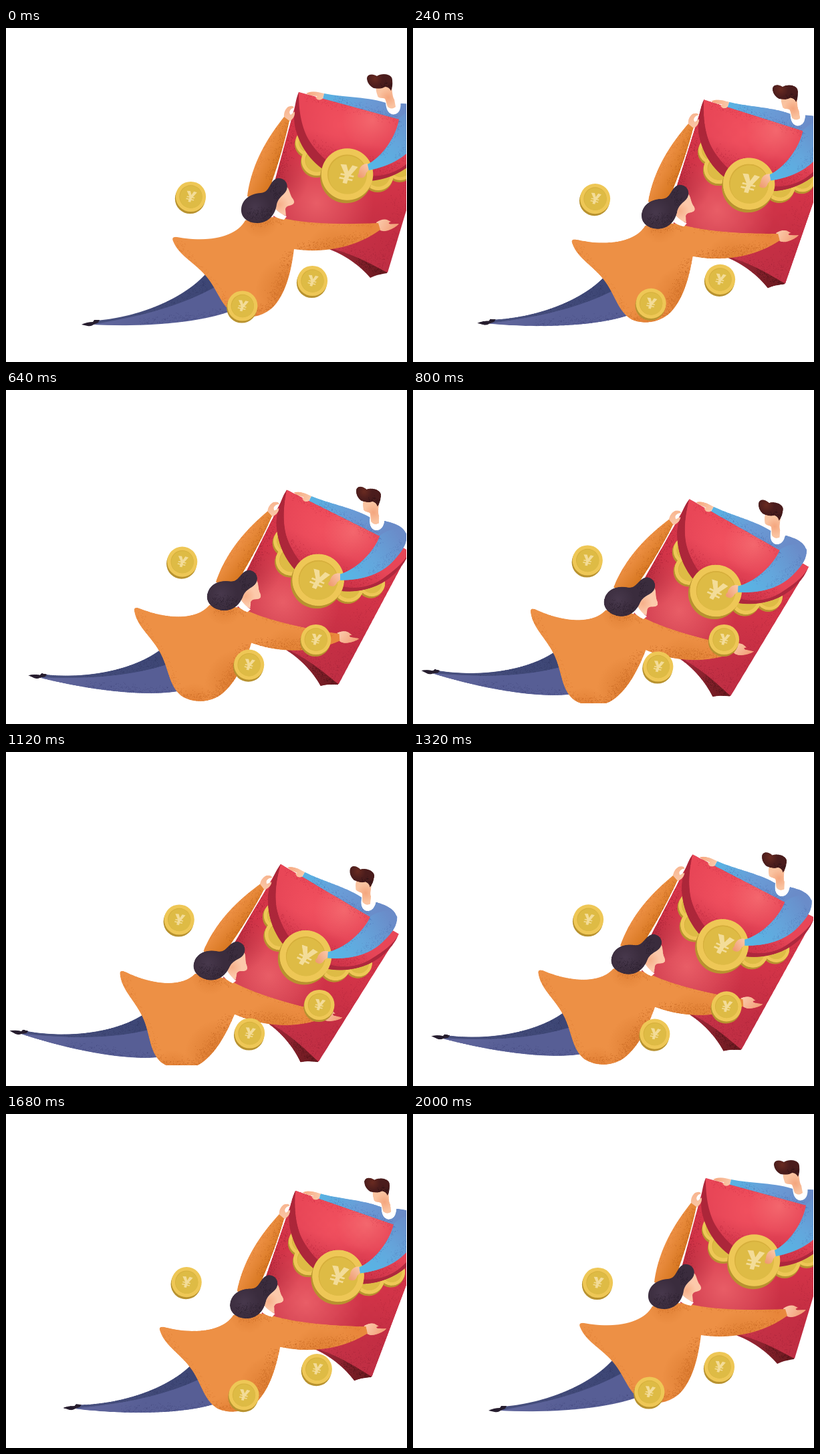
These frames come from a looping animation (600 by 500 pixels, 2040 ms). An HTML page with a canvas:

```html
<!DOCTYPE html>
<html lang="en">
<head>
<meta charset="utf-8">
<title>Red envelope</title>
<style>
html, body { margin: 0; width: 100%; height: 100%; overflow: hidden; background: #fff; }
canvas { display: block; width: 600px; height: 500px; }
</style>
</head>
<body>
<canvas id="stage" width="600" height="500"></canvas>
<script>
const LOOP = 2040, STEP = 40, CYCLE = 2000;
const PIVOT = [158, 32], SWING = 16 * Math.PI / 180;
const ctx = document.getElementById('stage').getContext('2d');

let seed = 7;
function rnd() {
  seed = (seed * 16807) % 2147483647;
  return seed / 2147483647;
}
const bell = () => rnd() + rnd() + rnd() - 1.5;

// Linear gradient along a line [x0, y0, x1, y1].
function ramp(c, line, ...colors) {
  const g = c.createLinearGradient(...line);
  colors.forEach((color, i) => g.addColorStop(i / (colors.length - 1), color));
  return g;
}

// Soft round tint [x, y, radius, 'r,g,b', alpha].
function tint(c, [x, y, r, rgb, a]) {
  const g = c.createRadialGradient(x, y, 0, x, y, r);
  g.addColorStop(0, `rgba(${rgb},${a})`);
  g.addColorStop(1, `rgba(${rgb},0)`);
  c.fillStyle = g;
  c.fillRect(x - r, y - r, 2 * r, 2 * r);
}

// Grain scattered along a line [x0, y0, x1, y1, width, count, color].
function spray(c, [x0, y0, x1, y1, w, n, color]) {
  const len = Math.hypot(x1 - x0, y1 - y0);
  const nx = (y0 - y1) / len, ny = (x1 - x0) / len;
  c.fillStyle = color;
  for (let i = 0; i < n; i++) {
    const k = rnd(), d = bell() * w;
    c.fillRect(x0 + (x1 - x0) * k + nx * d, y0 + (y1 - y0) * k + ny * d, 0.9, 0.9);
  }
}

function shape(c, d, paint, tints = [], grains = []) {
  const path = new Path2D(d);
  c.fillStyle = paint;
  c.fill(path);
  if (!tints.length && !grains.length) return;
  c.save();
  c.clip(path);
  tints.forEach(t => tint(c, t));
  grains.forEach(g => spray(c, g));
  c.restore();
}

function disc(c, x, y, r, paint) {
  c.fillStyle = paint;
  c.beginPath();
  c.arc(x, y, r, 0, 2 * Math.PI);
  c.fill();
}

function coin(c, x, y, r, drop, mark = true) {
  disc(c, x - drop * 0.35, y + drop, r, '#b8922f');
  disc(c, x, y, r, '#eec756');
  disc(c, x, y, r * 0.76, '#d6af3c');
  disc(c, x + r * 0.015, y + r * 0.025, r * 0.74, '#debb45');
  if (!mark) return;
  c.save();
  c.translate(x, y);
  c.rotate(0.2);
  c.scale(r, r);
  c.fillStyle = '#f3dc98';
  c.fill(new Path2D('M-.33-.33L-.1-.36L.02-.12L.13-.38L.35-.36L.14 0L.27 0L.26 .07L.09 .07L.08 .15L.25 .15L.24 .22L.07 .22L.06 .36L-.11 .36L-.1 .22L-.28 .22L-.27 .15L-.09 .15L-.08 .07L-.26 .07L-.25 0L-.1 0Z'));
  c.restore();
}

function drawMan(c) {
  shape(c, 'M476 98C505 104 545 103 571 113L590 113C612 113 628 118 628 135L600 160L474 106Z',
    ramp(c, [476, 100, 600, 130], '#58b3e3', '#6a9bd6', '#6a8bc8'), [],
    [[490, 108, 585, 134, 7, 260, 'rgba(64,90,160,.35)']]);
  shape(c, 'M568 111Q569 129 580 129.5Q591 128 590.5 113L586 106L582 112Z', '#fff');
  shape(c, 'M554 88C553 94 555 98 556.5 103C560 106 564 104 567 106C569 110 569 113 571 118Q577 123 583 118L581 107C578 103 578 95 577 86Z',
    '#fac3a0', [[572, 104, 14, '236,130,84', 0.45]]);
  shape(c, 'M540 76C540 69 548 68 555 72C562 67 578 68 578 78Q579 88 576 94Q573 88 567 88Q562 92 550 90Q541 85 540 76Z',
    '#4a1c1c', [[552, 76, 12, '126,52,36', 0.6]], [[560, 86, 577, 86, 6, 60, '#2e1216']]);
}

function drawEnvelope(c) {
  shape(c, 'M480 330C505 338 530 356 545 374Q555 369 570 367L575 350L500 325Z',
    ramp(c, [490, 332, 560, 372], '#a12738', '#6c1a20'), [],
    [[525, 345, 568, 368, 8, 150, '#54141a']]);
  shape(c, 'M438 96L636 150L571 366C555 359 532 343 493 332L400 300L400.5 235Z',
    ramp(c, [530, 120, 480, 350], '#d73549', '#d23448', '#c23146'),
    [[465, 262, 85, '255,128,128', 0.55], [408, 225, 45, '150,25,45', 0.4], [590, 320, 90, '175,32,55', 0.3]],
    [[436, 105, 402, 235, 14, 420, 'rgba(140,24,42,.5)'],
     [632, 160, 570, 362, 26, 650, 'rgba(140,24,46,.3)'],
     [450, 325, 565, 352, 20, 400, 'rgba(120,20,40,.35)']]);

  coin(c, 454, 171, 21, 3, false);
  coin(c, 465, 198, 23, 3, false);
  coin(c, 590, 208, 20, 3, false);
  coin(c, 557, 220, 23, 3, false);

  shape(c, 'M438 96C432 110 429 135 433 150C440 180 460 205 485 218C530 238 575 230 605 205C622 190 634 170 636 150Z',
    ramp(c, [432, 110, 600, 220], '#ac2639', '#ae283d'));
  shape(c, 'M438 96C438 118 440 140 450 162C462 185 487 211 520 219C560 227 588 217 607 196C621 181 633 166 636 150Z',
    ramp(c, [540, 118, 515, 220], '#ea4757', '#e64557', '#c92f45'),
    [[500, 145, 60, '255,95,105', 0.4], [548, 138, 46, '255,140,135', 0.45]],
    [[445, 101, 590, 140, 7, 240, 'rgba(190,36,58,.4)'],
     [455, 175, 520, 212, 16, 320, 'rgba(165,28,50,.4)'],
     [520, 216, 600, 202, 16, 300, 'rgba(165,28,50,.4)']]);
  coin(c, 510.5, 219, 38.8, 4.5);
}

function drawManArm(c) {
  shape(c, 'M541 203C532 203 528 210 528 217Q524 223 529 224Q537 226 539 217L543 212Z',
    ramp(c, [542, 205, 528, 222], '#fac8a8', '#ef9c72'));
  shape(c, 'M588 136C585 158 566 191 541 204L543 213C575 207 602 192 616 168C628 148 630 138 627 126C618 116 600 122 588 136Z',
    ramp(c, [544, 208, 618, 130], '#56b7e6', '#64a6dc', '#6a8cc9'), [],
    [[588, 138, 560, 190, 8, 200, 'rgba(64,88,165,.4)'],
     [625, 140, 585, 198, 9, 200, 'rgba(70,100,170,.35)']]);
  shape(c, 'M449 98Q456 94 467 96L476 98L474 105Q471 109 466 107L463 104L466 102Q457 102 449 98Z',
    ramp(c, [450, 97, 474, 105], '#f6a77f', '#fac8a8'));
}

function drawWoman(c) {
  // legs and shoes
  shape(c, 'M134 438C190 434 260 410 298 369L332 405L318 424C260 438 200 440 134 443Z',
    ramp(c, [140, 440, 310, 385], '#48507f', '#3d4675'), [],
    [[190, 430, 300, 385, 12, 280, 'rgba(34,38,78,.4)']]);
  shape(c, 'M130 444C150 439 240 429 316 386L336 424C290 441 210 448 130 444Z',
    ramp(c, [180, 424, 205, 452], '#5f659b', '#575e95'), [],
    [[200, 443, 330, 426, 9, 260, 'rgba(50,54,105,.4)']]);
  shape(c, 'M113 444Q121 440 130 440L132 437L140 437L138 441L131 444Q127 447 122 446Z', '#261d2e');

  // raised arm
  shape(c, 'M416 134Q415 124 422 118Q429 115 431 119L427 121Q422 126 426 130L432 125Q433 134 424 140Z',
    ramp(c, [418, 118, 424, 140], '#f8b48e', '#fac8a8'));
  shape(c, 'M416 133C398 156 368 197 361 252L395 262L398 230C405 210 416 176 424 139Z',
    ramp(c, [382, 190, 409, 203], '#ed9044', '#d87822'), [],
    [[422, 142, 398, 228, 11, 330, 'rgba(180,88,20,.5)'],
     [405, 148, 364, 230, 7, 130, 'rgba(205,105,35,.4)']]);

  // front hand and coat
  shape(c, 'M554 291Q563 285 570 287L576 290Q570 292 575 293.5L588 293Q583 299 572 303Q562 306 558 301Z',
    ramp(c, [558, 290, 580, 302], '#fac8a8', '#f3a17a'));
  shape(c, 'M358 288C345 312 305 322 256 313Q247 312 250 319C259 342 285 352 303 376C318 396 323 418 343 429C362 437 388 432 403 414C420 393 427 362 431 331C470 337 520 331 560 302L557 292C510 294 460 294 420 286C400 280 375 285 358 288Z',
    '#ed9045',
    [[425, 395, 52, '205,105,30', 0.6], [495, 342, 48, '208,108,30', 0.55], [545, 300, 45, '225,122,45', 0.45],
     [380, 286, 28, '205,105,30', 0.4], [365, 440, 34, '210,105,30', 0.5]],
    [[429, 335, 395, 424, 14, 420, 'rgba(184,88,20,.5)'],
     [435, 332, 550, 312, 10, 420, 'rgba(184,88,20,.5)'],
     [252, 322, 340, 426, 10, 280, 'rgba(200,100,30,.4)'],
     [340, 429, 400, 420, 9, 180, 'rgba(184,88,20,.4)'],
     [365, 292, 415, 288, 7, 130, 'rgba(184,88,20,.4)'],
     [430, 290, 550, 295, 5, 140, 'rgba(200,100,30,.4)']]);

  // head
  shape(c, 'M420 238C424 240 424 247 428 254C432 259 432 262 429 264C424 267 420 265 418 271L419 281L402 275C404 262 406 250 420 238Z',
    '#fcc9aa', [[409, 264, 14, '240,150,105', 0.5]]);
  shape(c, 'M403 271Q410 278 420 282L416 287Q405 285 399 280Z', '#fff');
  shape(c, 'M352 271C353 257 365 248 381 247C396 246 393 229 406 225C417 224 423 233 420 242C417 250 408 252 405 264C403 280 392 292 376 292C361 292 351 283 352 271Z',
    '#3a2c3d', [[372, 268, 24, '82,66,88', 0.55]],
    [[360, 280, 398, 278, 10, 140, 'rgba(32,22,36,.6)'], [398, 235, 408, 256, 8, 60, 'rgba(32,22,36,.6)']]);
}

const group = document.createElement('canvas');
group.width = 1300;
group.height = 960;
const gc = group.getContext('2d');
gc.scale(2, 2);
[drawMan, drawEnvelope, drawManArm, drawWoman].forEach(draw => draw(gc));

// Drift of the loose coins: offsets at the shared key times.
const KEYS = [0, 480, 800, 1120, 1520, 1680];
const COINS = [
  { x: 276.5, y: 252.5, dx: [0, -9.7, -15.3, -17.3, -9.5, -6.3], dy: [0, 5.5, 2.5, -1.5, -1.3, -0.8] },
  { x: 353.8, y: 416, dx: [0, 6, 13, 10.8, 4.8, 2.2], dy: [0, -6, -2, 5, 6, 4.7] },
  { x: 458.5, y: 378.5, dx: [0, 3.6, 7, 10.4, 9.8, 6.8], dy: [0, -4, -5, 0, 4.2, 3.2] }
];

// Closed Hermite spline through the keys.
function drift(v, t) {
  const n = KEYS.length;
  const at = i => v[(i + n) % n];
  const time = i => KEYS[(i + n) % n] + Math.floor(i / n) * CYCLE;
  const slope = i => (at(i + 1) - at(i - 1)) / (time(i + 1) - time(i - 1));
  let i = 0;
  while (i < n - 1 && t >= KEYS[i + 1]) i++;
  const span = time(i + 1) - time(i), s = (t - time(i)) / span;
  const s2 = s * s, s3 = s2 * s;
  return (2 * s3 - 3 * s2 + 1) * at(i) + (3 * s2 - 2 * s3) * at(i + 1)
    + span * ((s3 - 2 * s2 + s) * slope(i) + (s3 - s2) * slope(i + 1));
}

function render(t) {
  const p = 1 - Math.abs(t / (CYCLE / 2) - 1);
  ctx.fillStyle = '#fff';
  ctx.fillRect(0, 0, 600, 500);

  ctx.save();
  ctx.beginPath();
  ctx.rect(0, 0, 599, 469);
  ctx.clip();
  ctx.translate(...PIVOT);
  ctx.rotate(SWING * p * p * (3 - 2 * p));
  ctx.translate(-PIVOT[0], -PIVOT[1]);
  ctx.drawImage(group, 0, 0, 650, 480);
  ctx.restore();

  const u = t % CYCLE;
  COINS.forEach(k => coin(ctx, k.x + drift(k.dx, u), k.y + drift(k.dy, u), 22.6, 3));
}

const start = performance.now();
function tick() {
  const t = (performance.now() - start) % LOOP;
  render(Math.floor(t / STEP) * STEP);
  requestAnimationFrame(tick);
}
tick();
</script>
</body>
</html>
```
